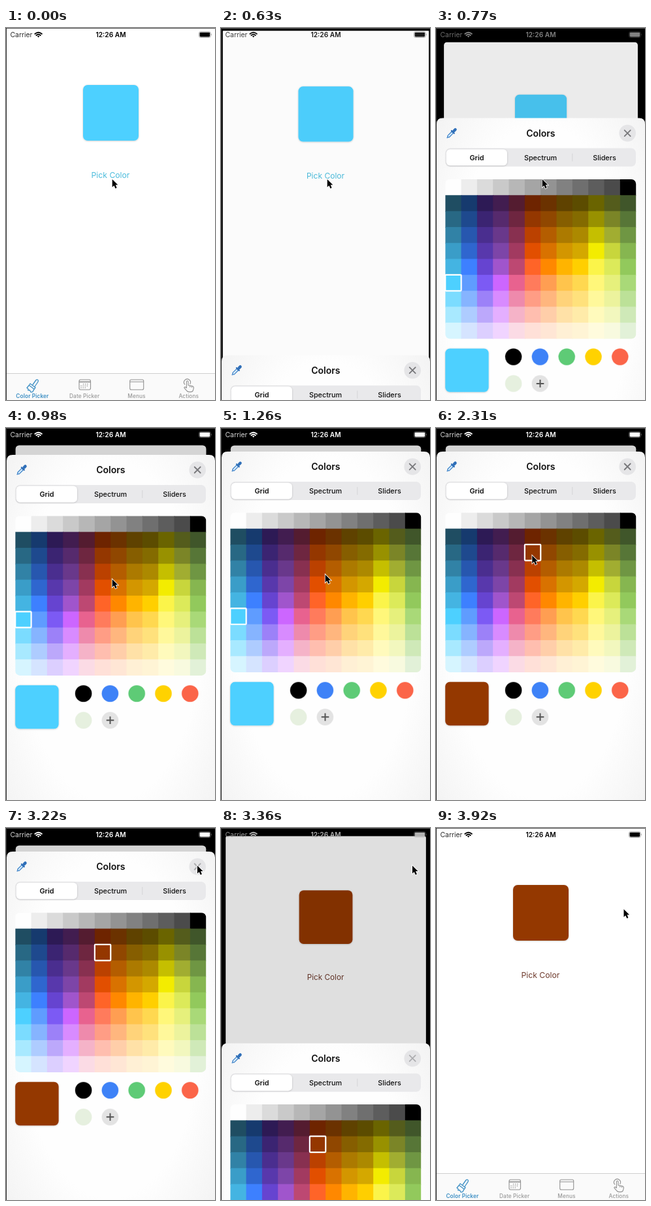
An HTML page that plays this animation: 320 px wide and 568 px high, repeating every 3990 ms.

```html
<!DOCTYPE html>
<html lang="en">
<head>
<meta charset="utf-8">
<title>Color picker</title>
<style>
html, body { margin: 0; width: 100%; height: 100%; overflow: hidden; background: #000; }
svg { display: block; width: 100vw; height: 100vh; }
text { font-family: Inter, Roboto, sans-serif; }
.mid { text-anchor: middle; }
.line { fill: none; stroke-linecap: round; stroke-linejoin: round; }
</style>
</head>
<body>
<svg viewBox="0 0 320 568" preserveAspectRatio="none">
  <defs>
    <radialGradient id="paper" cx=".5" cy=".45" r=".72">
      <stop offset=".6" stop-color="#fefefe"/><stop offset="1" stop-color="#f1f1f1"/>
    </radialGradient>
    <filter id="soft" x="-20%" y="-20%" width="140%" height="140%">
      <feDropShadow dx="0" dy=".5" stdDeviation="1" flood-opacity=".25"/>
    </filter>
    <clipPath id="round"><rect x="14.2" y="93.3" width="292" height="243.6" rx="7"/></clipPath>
  </defs>
  <rect width="320" height="568" fill="#000"/>

  <g id="page">
    <rect id="back" x="1" y="1" width="319" height="580" fill="#fff"/>
    <rect id="well" x="118" y="87" width="85" height="85" rx="7" filter="url(#soft)"/>
    <text id="pick" class="mid" x="160" y="229.3" font-size="12.2">Pick Color</text>
    <rect x="1" y="527" width="319" height="54" fill="#fafafa"/>
    <path d="M1 527.5H320" stroke="#cfcfcf"/>
    <g id="tabs" class="mid" font-size="8.3" letter-spacing=".1"></g>
    <g class="line" stroke="#3d8fc4" stroke-width="1.3">
      <path d="M41 544.5L46 537.5Q48 536 49.3 538Q49.7 539.3 48.5 541L44 547.5"/>
      <path d="M37 543L45 549L43.2 551.4L35.3 545.5ZM35.3 545.5L32 549.5L34 551L33.8 553L36.3 552.8L38 556L40.7 555.6L43.2 551.4"/>
    </g>
    <g class="line" stroke="#929292" stroke-width="1.1">
      <rect x="112" y="537" width="17.5" height="15.2" rx="2.2"/>
      <path d="M112.5 540.4H129" stroke-width="1.6"/>
      <path d="M118.5 543.7H127M115 546.5H127M115 549.3H124" stroke-width="1.4" stroke-dasharray=".1 3"/>
      <rect x="189.7" y="537" width="21" height="15.2" rx="2"/>
      <path d="M190 540.2H210.5"/>
      <path d="M276.4 549V540.3Q276.4 538.8 277.7 538.8T279 540.3V545.5L285.3 546.8Q287.6 547.4 287.3 549.8L286.6 552.8Q285.8 555.6 283 555.6H280Q278 555.6 276.5 553.6L273 549.6Q272.6 548.2 274.2 548L276.4 549.6M281.8 546V548.3M284.5 546.6V548.8"/>
      <path d="M273.6 544.2A5 5 0 1 1 281.9 543.4"/>
    </g>
    <rect id="dim" x="1" y="1" width="319" height="580"/>
  </g>

  <g id="status">
    <text x="6.6" y="14" font-size="10.3" fill-opacity=".85">Carrier</text>
    <text class="mid" x="160.5" y="14" font-size="10.2" font-weight="600">12:26 AM</text>
    <path class="line" d="M44.3 9Q49.6 4.4 54.9 9M46.3 11.2Q49.6 8.4 52.9 11.2" stroke="currentColor" stroke-width="1.8"/>
    <path d="M47.8 12.5Q49.6 11.2 51.4 12.5L49.6 14.4Z"/>
    <rect x="295.5" y="5.7" width="17.8" height="8.8" rx="2.4" fill="none" stroke="currentColor" stroke-opacity=".4" stroke-width=".8"/>
    <rect x="296.6" y="6.8" width="15.6" height="6.6" rx="1.4"/>
    <path d="M314.2 8.6Q315.6 10.1 314.2 11.6Z" fill-opacity=".5"/>
  </g>

  <g id="sheet">
    <path d="M1 600V9Q1 0 10 0H311Q320 0 320 9V600Z" fill="url(#paper)"/>
    <g transform="translate(24 23) rotate(45)">
      <rect x="-1.7" y="-2" width="3.4" height="10" rx="1.4" fill="#d9ecfa" stroke="#3a80c8" stroke-width="1.2"/>
      <path d="M0 8V10.3" stroke="#3a80c8" stroke-width="1.4"/>
      <rect x="-3.8" y="-3.7" width="7.6" height="2.3" rx="1" fill="#2f6fb8"/>
      <rect x="-2.2" y="-10" width="4.4" height="7" rx="2.1" fill="#2f6fb8"/>
    </g>
    <text class="mid" x="160.3" y="28" font-size="14" font-weight="600" fill="#111">Colors</text>
    <circle cx="293.2" cy="23" r="12.8" fill="#e5e5e7"/>
    <path id="cross" class="line" d="M288.7 18.5l9 9m0-9l-9 9" stroke-width="1.8"/>
    <rect x="14.5" y="46" width="291.5" height="28" rx="7" fill="#e9e9eb"/>
    <rect x="15.7" y="47.6" width="93.3" height="24.8" rx="6" fill="#fff" filter="url(#soft)"/>
    <path d="M208.8 54V66" stroke="#d4d4d7"/>
    <g class="mid" font-size="10.8" fill="#111">
      <text x="62.5" y="64" font-weight="600">Grid</text>
      <text x="160" y="64" font-weight="500">Spectrum</text>
      <text x="258" y="64" font-weight="500">Sliders</text>
    </g>
    <g id="grid" clip-path="url(#round)"></g>
    <rect id="mark" width="24.4" height="24.4" rx="1" fill="none" stroke="#fff" stroke-width="2.2"/>
    <rect id="swatch" x="14.2" y="351.8" width="66.4" height="66.4" rx="7" filter="url(#soft)"/>
    <g id="dots"></g>
    <path d="M153.7 405.3h11.6m-5.8-5.8v11.6" stroke="#555" stroke-width="2"/>
  </g>

  <path d="M0 .5H320" stroke="#5a5a5a"/>
  <path d="M.5 0V568" stroke="#2c2c2c"/>
  <path id="cursor" d="M0 0V12L2.7 9.4L4.8 14L6.9 13L5 8.6H8.6Z" fill="#000" stroke="#fff" stroke-width="1.6" paint-order="stroke"/>
</svg>

<script>
const LOOP = 3990, STEP = 70, CELL = 24.33;
const OPEN = 594.4, PICKED = 2030, PRESS = 3150, CLOSE = 3254;
const $ = id => document.getElementById(id);

function add(parent, tag, attrs, label) {
  const el = document.createElementNS(parent.namespaceURI, tag);
  set(el, attrs);
  if (label) el.textContent = label;
  parent.appendChild(el);
}
function set(el, attrs) {
  for (const k in attrs) el.setAttribute(k, attrs[k]);
}

const clamp = v => Math.max(0, Math.min(1, v));
const ramp = (t, a, b) => clamp((t - a) / (b - a));
const lerp = (a, b, k) => a + (b - a) * k;
const smooth = k => k * k * (3 - 2 * k);
const spring = ms => {
  const x = Math.max(0, ms) * 0.0174;
  return 1 - (1 + x) * Math.exp(-x);
};
const rgb = hex => [0, 2, 4].map(i => parseInt(hex.substr(i, 2), 16));
const mix = (a, b, k) => {
  const to = rgb(b);
  return `rgb(${rgb(a).map((v, i) => Math.round(lerp(v, to[i], k)))})`;
};

// Each hue column runs through five key shades placed on these rows.
const KEY_ROWS = [1, 4, 5, 6, 9];
const HUES = [
  '1f4d62 3a9dc8 44b4e2 4dd0ff d6f5ff', '163a6e 2f66cf 3d80ff 5f9cff d5e4ff',
  '2d1a55 5838ac 6644d0 7c5af4 dccfff', '421d50 7d45a8 a055cc cc66ff f0d4ff',
  '541c30 a23a60 bd4872 e8628f fbdbe5', '6e2400 e24f00 ff6428 ff7b5c ffe0d8',
  '6b3200 d97200 ff8800 ff9e52 ffe6d5', '5f4200 d39600 ffb400 ffc44c fff0d5',
  '5c4c00 d4a800 ffcf00 ffd850 fff4d5', '6a6400 f3ec00 fbf44a fff77a fffbdd',
  '545c1c c8d63c dcea5a e6f07c f8fadf', '40562a 86b650 92c95c a9d978 e2f1d8'
].map(s => s.split(' '));
const BLUE = '#4dd0ff', BROWN = '#943700';

function shade(col, row) {
  if (row === 0) {
    const v = col === 0 ? 254 : col === 11 ? 0 : 255 - col * 18;
    return `rgb(${v},${v},${v})`;
  }
  if (col === 5 && row === 2) return BROWN;
  let i = 0;
  while (row > KEY_ROWS[i + 1]) i++;
  return mix(HUES[col][i], HUES[col][i + 1], ramp(row, KEY_ROWS[i], KEY_ROWS[i + 1]));
}
const cellX = col => 14.2 + col * CELL;
const cellY = row => 93.3 + row * CELL;

for (let row = 0; row < 10; row++)
  for (let col = 0; col < 12; col++)
    add($('grid'), 'rect', { x: cellX(col), y: cellY(row), width: CELL + 1, height: CELL + 1, fill: shade(col, row) });

['#000', '#3e82f7', '#5ecb76', '#ffd200', '#fb6549', '#e6f0df', '#e3e3e3'].forEach((fill, i) =>
  add($('dots'), 'circle', {
    cx: 118.6 + (i % 5) * 40.8, cy: i < 5 ? 364.5 : 405.3, r: 12.6, fill,
    stroke: fill, 'stroke-opacity': 0.3, 'stroke-width': 1.2
  }));

['Color Picker', 'Date Picker', 'Menus', 'Actions'].forEach((name, i) =>
  add($('tabs'), 'text', {
    x: 40.4 + i * 79.8, y: 565.3, fill: i ? '#999' : '#3d8fc4', 'font-weight': i ? 500 : 600
  }, name));

function cursorAt(t) {
  if (t >= 3920) return [287.5, 124];
  const a = smooth(ramp(t, 1120, 1610)), b = smooth(ramp(t, 2340, 2730));
  return [lerp(lerp(162.7, 147.3, a), 293, b), lerp(lerp(231, 194.7, a), 57.5, b)];
}

function draw(t) {
  const up = spring(t - OPEN) - spring(t - CLOSE);
  const fade = ramp(t, OPEN, OPEN + 350) - ramp(t, CLOSE, CLOSE + 350);
  const dim = 0.17 * (ramp(t, OPEN, OPEN + 390) - ramp(t, CLOSE, CLOSE + 390));
  const picked = t >= PICKED;
  const color = picked ? BROWN : BLUE;
  const tap = ramp(t, 0, 140) - ramp(t, 210, 420);

  const k = 1 - 0.086 * up;
  set($('page'), { transform: `translate(161 300) scale(${k}) translate(-161 -300)` });
  set($('back'), { rx: 6 * up });
  set($('dim'), { rx: 6 * up, 'fill-opacity': dim });
  set($('well'), { fill: color });
  set($('pick'), { fill: picked ? '#6e3a2c' : '#4cbcdc', opacity: 1 - 0.75 * tap });

  const ink = mix('000000', 'ffffff', fade);
  set($('status'), { fill: ink, color: ink });

  set($('sheet'), { transform: `translate(0 ${568 - 532 * up})` });
  set($('cross'), { stroke: t >= PRESS ? '#adadb0' : '#77777a' });
  set($('mark'), { x: cellX(picked ? 5 : 0), y: cellY(picked ? 2 : 6) });
  set($('swatch'), { fill: color });
  set($('cursor'), { transform: `translate(${cursorAt(t)})` });
}

const start = performance.now();
function tick() {
  const t = (performance.now() - start) % LOOP;
  draw(Math.floor(t / STEP) * STEP);
  requestAnimationFrame(tick);
}
tick();
</script>
</body>
</html>
```
